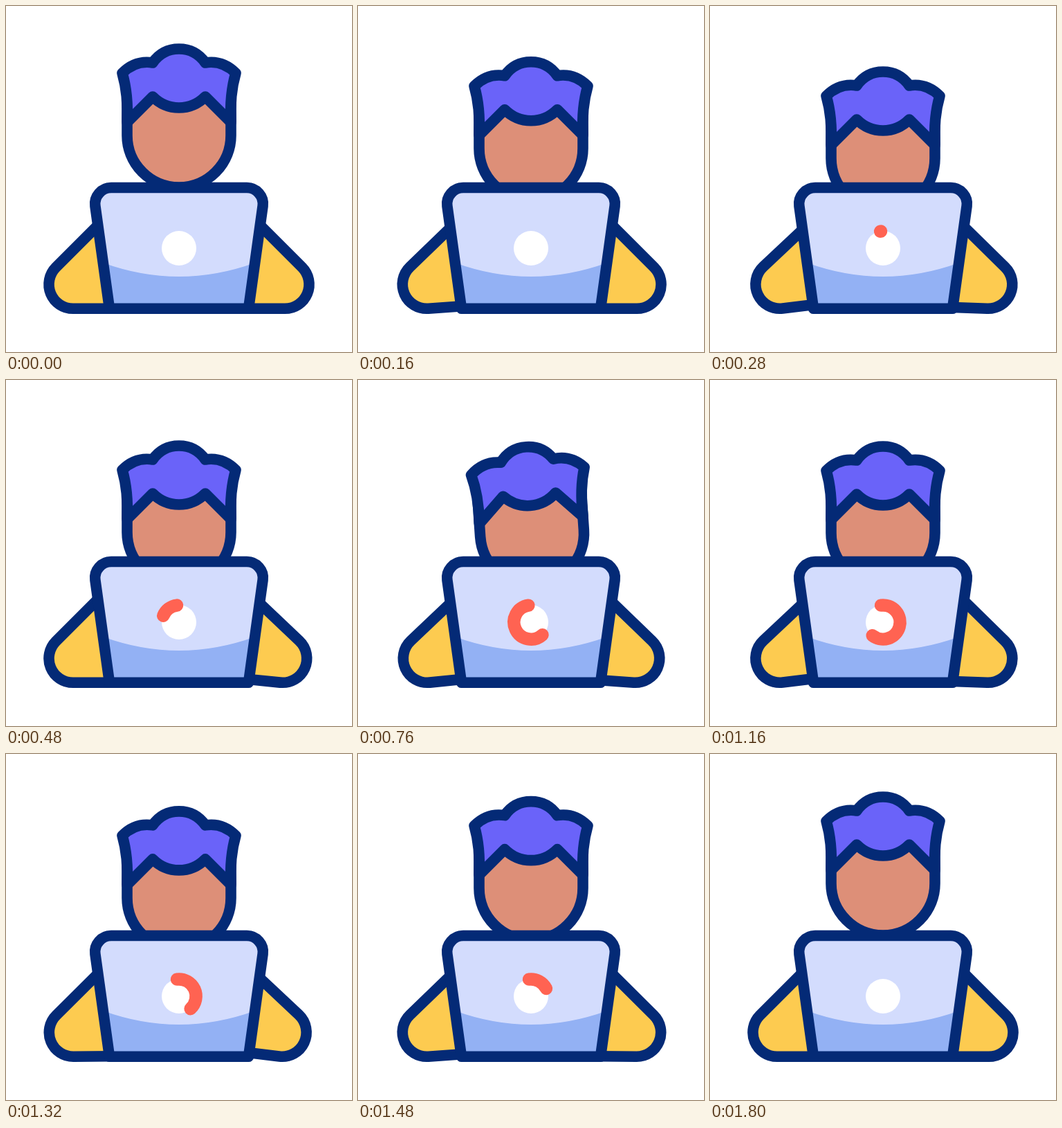
An HTML page that plays this animation: 500 px wide and 500 px high, repeating every 2 s.

```html
<!DOCTYPE html>
<html lang="en">
<head>
<meta charset="utf-8">
<title>Working at a laptop</title>
<style>
  html, body { margin: 0; width: 100%; height: 100%; overflow: hidden; background: #fff; }
  svg { display: block; width: 100%; height: 100%; }
  .line { stroke: #042a76; stroke-width: 15.6; stroke-linecap: round; stroke-linejoin: round; }
</style>
</head>
<body>
<svg viewBox="0 0 500 500">
  <g id="head" class="line">
    <path fill="#dd8f78" d="M175 115V187A75 75 0 0 0 325 187V115Z"/>
    <path fill="#6a63f9" d="M168 97Q187 78 212 82Q226 62 250 62Q274 62 288 82Q313 78 332 97Q323 128 325 168L288 131Q272 147 250 147Q228 147 212 131L175 168Q177 128 168 97Z"/>
  </g>
  <path id="left" class="line" fill="#fdcb50"/>
  <path id="right" class="line" fill="#fdcb50" transform="matrix(-1 0 0 1 500 0)"/>
  <clipPath id="lid"><path d="M149.5 437.3L128.9 289A23.4 23.4 0 0 1 152 262.5H348A23.4 23.4 0 0 1 371.1 289L350.5 437.3Z"/></clipPath>
  <g clip-path="url(#lid)">
    <path fill="#d3dcfd" d="M100 240H400V450H100Z"/>
    <path fill="#93b1f4" d="M140 371Q250 411 360 371V450H140Z"/>
  </g>
  <path class="line" fill="none" d="M149.5 437.3L128.9 289A23.4 23.4 0 0 1 152 262.5H348A23.4 23.4 0 0 1 371.1 289L350.5 437.3Z"/>
  <circle cx="250" cy="350" r="25" fill="#fff"/>
  <path id="ring" fill="none" stroke="#ff6352" stroke-width="18.5" stroke-linecap="round"/>
</svg>
<script>
  const LOOP = 2000, STEP = 40, RAD = Math.PI / 180;
  const [head, left, right, ring] = ['head', 'left', 'right', 'ring'].map(id => document.getElementById(id));

  // Keys are [time, value] pairs, eased in and out between neighbours.
  const drop = [[40, 0], [260, 33], [600, 33], [1040, 38], [1640, 0]];
  const tilt = [[600, 0], [800, -4.4], [1080, 0]];
  const tip = [[240, 0], [1160, 360]];
  const tail = [[720, 0], [1780, 360]];

  function at(keys, t) {
    if (t <= keys[0][0]) return keys[0][1];
    for (let i = 1; i < keys.length; i++) {
      const [t0, a] = keys[i - 1], [t1, b] = keys[i];
      if (t < t1) {
        const p = (t - t0) / (t1 - t0);
        return a + (b - a) * p * p * (3 - 2 * p);
      }
    }
    return keys[keys.length - 1][1];
  }

  function typing(t, start, beats) {
    const n = (t - start) / 440;
    return n < 0 || n > beats ? 0 : (1 - Math.cos(2 * Math.PI * n)) / 2;
  }

  // Left arm: a round elbow between the upper arm and the forearm.
  function arm(k) {
    const r = 35, x = 97 + 4 * k, y = 402.3;
    const a = (45 - 1.8 * k) * RAD, b = 7 * k * RAD;
    const x1 = x - r * Math.sin(a), y1 = y - r * Math.cos(a);
    const x2 = x + r * Math.sin(b), y2 = y + r * Math.cos(b);
    return `M${x1 + 105 * Math.cos(a)} ${y1 - 105 * Math.sin(a)}L${x1} ${y1}` +
      `A${r} ${r} 0 0 0 ${x2} ${y2}L${x2 + 56 * Math.cos(b)} ${y2 - 56 * Math.sin(b)}`;
  }

  // Counter-clockwise arc; angles count from just left of the top.
  function arc(from, to) {
    const point = deg => {
      const a = (deg + 7) * RAD;
      return `${250 - 24.6 * Math.sin(a)} ${350 - 24.6 * Math.cos(a)}`;
    };
    const span = Math.min(to - from, 359.9);
    return `M${point(from)}A24.6 24.6 0 ${span > 180 ? 1 : 0} 0 ${point(from + span)}`;
  }

  function draw(t) {
    head.setAttribute('transform', `translate(0 ${at(drop, t)}) rotate(${at(tilt, t)} 250 165)`);
    left.setAttribute('d', arm(typing(t, 40, 4)));
    right.setAttribute('d', arm(typing(t, 200, 3)));
    const from = at(tail, t), to = at(tip, t);
    ring.setAttribute('d', to > from ? arc(from, to) : '');
  }

  const begin = performance.now();
  function tick() {
    const t = (performance.now() - begin) % LOOP;
    draw(Math.floor(t / STEP) * STEP);
    requestAnimationFrame(tick);
  }
  tick();
</script>
</body>
</html>
```
